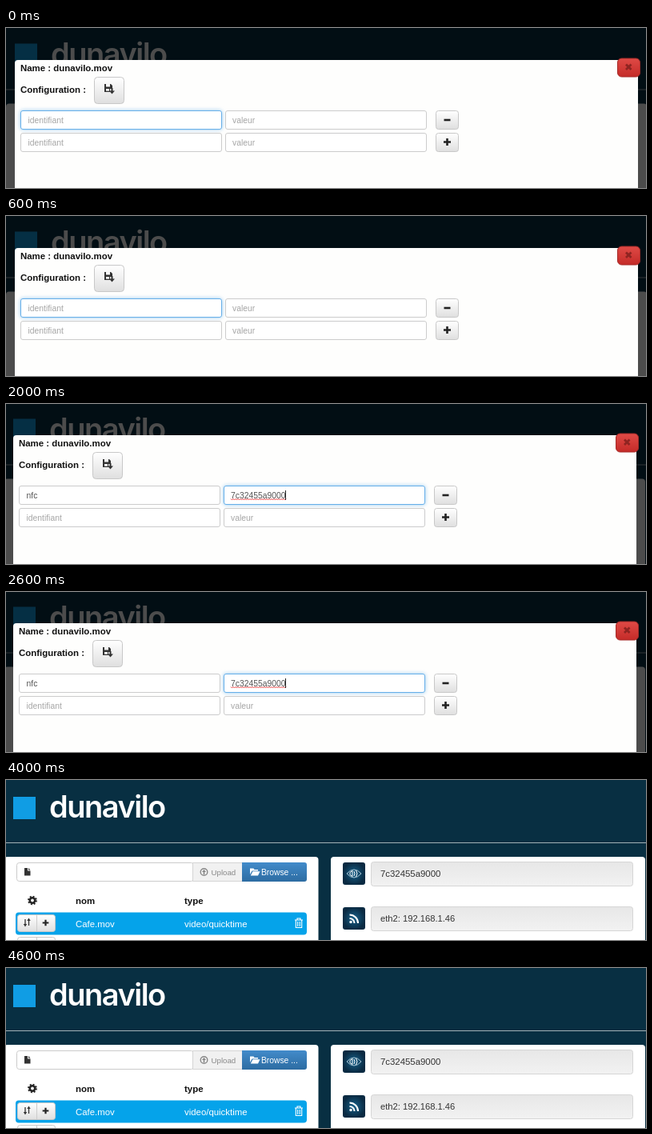
An HTML page that plays this animation: 800x200 px, repeating every 5000 ms.

```html
<!DOCTYPE html>
<html lang="fr">
<head>
<meta charset="utf-8">
<title>Configuration</title>
<style>
  html, body { margin: 0; width: 100%; height: 100%; overflow: hidden; background: #082f42; }
  svg { display: block; font: 11.4px "Liberation Sans", Arial, sans-serif; fill: #333; }
  .bold { font-weight: bold; font-size: 11.45px; fill: #111; }
  .brand { font: 600 38px Inter, sans-serif; letter-spacing: -1.5px; }
  .white { fill: #fff; }
  .field text { font-size: 10.35px; fill: #555; }
  .field.empty text { fill: #a5a5a5; }
  .field rect { fill: #fff; stroke: #ccc; }
  .field.focus rect { stroke: #66afe9; filter: drop-shadow(0 0 2.5px #66afe9b0); }
  .button { fill: url(#grey); stroke: #c8c8c8; }
  .line { fill: none; stroke: #222; stroke-width: 2.6; }
</style>
</head>
<body>
<svg width="800" height="200" viewBox="0 0 800 200">
  <defs>
    <linearGradient id="grey" x2="0" y2="1"><stop stop-color="#fff"/><stop offset="1" stop-color="#dfdfdf"/></linearGradient>
    <linearGradient id="well" x2="0" y2="1"><stop stop-color="#e7e7e7"/><stop offset="1" stop-color="#f2f2f2"/></linearGradient>
    <linearGradient id="blue" x2="0" y2="1"><stop stop-color="#428bca"/><stop offset="1" stop-color="#2d6ca2"/></linearGradient>
    <linearGradient id="red" x2="0" y2="1"><stop stop-color="#df4a46"/><stop offset="1" stop-color="#c42b28"/></linearGradient>
    <linearGradient id="green" x2="0" y2="1"><stop stop-color="#53ad53"/><stop offset="1" stop-color="#3d923d"/></linearGradient>
    <radialGradient id="glow"><stop stop-color="#17618a"/><stop offset="1" stop-color="#0a2a42"/></radialGradient>
    <path id="minus" class="line" d="M-4 0H4"/>
    <path id="plus" class="line" d="M-4.5 0H4.5M0-4.5V4.5"/>
    <path id="floppy" fill-rule="evenodd" d="M0 0H8L10 2V6H7V10H0ZM2 0V3.5H7V0ZM2 6V8.8H6V6Z"/>
    <g id="tools">
      <rect class="button" x="14.5" y="168.500" width="47" height="21" rx="3"/>
      <path d="M38.500 169V189" stroke="#ccc"/>
      <path d="M24 174V181M28.500 175V182" stroke="#333" stroke-width="1.3"/>
      <path d="M21.800 180H26.200L24 183.500ZM26.300 176H30.700L28.500 172.500Z"/>
      <use href="#plus" transform="translate(49.500 178.500) scale(.85)"/>
    </g>
  </defs>

  <g id="page">
    <rect x="-10" y="-10" width="820" height="230" fill="#082f42"/>
    <rect x="9" y="21" width="28" height="28" fill="#109de4"/>
    <text class="brand white" x="54" y="47">dunavilo</text>
    <path d="M-5 78.500H810" stroke="#a4b1b7"/>
    <rect class="white" x="-2" y="96" width="392.500" height="130" rx="4"/>
    <rect class="white" x="406" y="96" width="393" height="130" rx="4"/>

    <rect x="13.500" y="103.500" width="221" height="23" rx="3" fill="#fff" stroke="#ccc"/>
    <path d="M23 110H27V113.500H30.500V119.500H23ZM28 110L30.500 112.500H28Z"/>
    <path d="M233.500 103.500H296V126.500H233.500Z" fill="#f1f1f1" stroke="#d4d4d4"/>
    <circle cx="247.500" cy="115" r="4.300" fill="none" stroke="#888" stroke-width="1.4"/>
    <path d="M247.500 112L250 115H248.300V118H246.700V115H245Z" fill="#888"/>
    <text x="256.500" y="119" font-size="9.700" fill="#888">Upload</text>
    <path d="M295 103H373a3 3 0 0 1 3 3V124a3 3 0 0 1-3 3H295Z" fill="url(#blue)"/>
    <path class="white" d="M305 118V110.500H309.500L310.500 112H315V113.500H307.500ZM308.500 114.300H317.500L315 119.500H305.800Z"/>
    <text class="white" x="319" y="119" font-size="10.300">Browse ...</text>

    <circle cx="33" cy="150.500" r="3.200" class="line" stroke-width="2.4"/>
    <circle cx="33" cy="150.500" r="5" class="line" style="stroke-width:1.8" stroke-dasharray="1.96 1.96"/>
    <text class="bold" x="87" y="155">nom</text>
    <text class="bold" x="223" y="155">type</text>
    <rect x="12" y="165.500" width="364" height="28" rx="4" fill="#05a3ea"/>
    <use href="#tools"/>
    <use href="#tools" y="28"/>
    <text class="white" x="87" y="184">Cafe.mov</text>
    <text class="white" x="223" y="184">video/quicktime</text>
    <path d="M361 175H371M364 175V173H368V175M362.300 175V184.500H369.700V175M364.700 177V183M367.300 177V183" fill="none" stroke="#fff" stroke-width="1.1"/>

    <g stroke="#d6d6d6" fill="url(#well)">
      <rect x="456.500" y="102.500" width="327" height="30" rx="3"/>
      <rect x="456.500" y="158.500" width="327" height="30" rx="3"/>
    </g>
    <rect x="421" y="103" width="28" height="28" rx="3" fill="url(#glow)"/>
    <rect x="421" y="159" width="28" height="28" rx="3" fill="url(#glow)"/>
    <g fill="none" stroke="#a9c8d8">
      <path d="M426 117Q435 107 444 117Q435 127 426 117"/>
      <path d="M430 115.500V118.500L433 120.500V113.500ZM435 114q2 3 0 6M437.500 113q3 4 0 8" stroke="#fff"/>
    </g>
    <path d="M429.500 173a6 6 0 0 1 6 6M429.500 168.500a10.500 10.500 0 0 1 10.500 10.500" fill="none" stroke="#fff" stroke-width="2"/>
    <circle class="white" cx="431" cy="177.500" r="1.700"/>
    <text x="468" y="121">7c32455a9000</text>
    <text x="468" y="177" font-size="11.200">eth2: 192.168.1.46</text>
  </g>

  <g id="overlay">
    <rect width="800" height="200" opacity=".7" fill="#000"/>
    <g id="modal">
      <rect x="11" y="40" width="779" height="180" rx="4" fill="#fefefd"/>
      <text class="bold" x="18" y="54">Name : dunavilo.mov</text>
      <text class="bold" x="18" y="81">Configuration :</text>
      <g id="save">
        <rect class="button" x="110.500" y="61.500" width="37" height="33" rx="4"/>
        <use href="#floppy" x="123" y="70"/>
        <path d="M131.500 75H133.500V78.500H136L132.500 82.500L129 78.500H131.500Z"/>
      </g>
      <g id="saved">
        <rect x="110.500" y="61.500" width="37" height="33" rx="3" fill="url(#green)" stroke="#6f9fd0" stroke-width="1.500"/>
        <use class="white" href="#floppy" x="123" y="70"/>
        <path d="M129.500 78.500L132 81L136.500 76" fill="none" stroke="#fff" stroke-width="2"/>
      </g>
      <g id="key" class="field"><rect x="18.500" y="103.500" width="251" height="23" rx="2.500"/><text x="27.500" y="119"></text></g>
      <g id="value" class="field"><rect x="274.500" y="103.500" width="251" height="23" rx="2.500"/><text x="283" y="119"></text></g>
      <g class="field empty"><rect x="18.500" y="131.500" width="251" height="23" rx="2.500"/><text x="27.500" y="147">identifiant</text></g>
      <g class="field empty"><rect x="274.500" y="131.500" width="251" height="23" rx="2.500"/><text x="283" y="147">valeur</text></g>
      <path id="squiggle" fill="none" stroke="#e33" stroke-width=".9"/>
      <path id="caret" stroke="#222"/>
      <rect class="button" x="537.500" y="103.500" width="28" height="23" rx="3"/>
      <rect class="button" x="537.500" y="131.500" width="28" height="23" rx="3"/>
      <use href="#minus" x="551.500" y="115"/>
      <use href="#plus" x="551.500" y="142.500"/>
      <rect x="764.500" y="38" width="28" height="23" rx="5" fill="url(#red)" stroke="#a52b28"/>
      <path d="M775 45.500L781.500 52M781.500 45.500L775 52" stroke="#8f2421" stroke-width="2.800"/>
    </g>
  </g>
</svg>
<script>
  const $ = id => document.getElementById(id);
  const steps = [
    { x: 0, y: 0, focus: "key" },
    { x: 0, y: 0, key: "nfc", focus: "key", caret: 41.5 },
    { x: -2, y: -1, key: "nfc", value: "7c32455a9000", focus: "value", caret: 351.5 },
    { x: -1.5, y: -.5, key: "nfc", value: "7c32455a9000", saved: true },
    { closed: true }
  ];

  const show = (id, on) => $(id).setAttribute("display", on ? "inline" : "none");
  const move = (id, x, y) => $(id).setAttribute("transform", `translate(${x} ${y})`);

  function setField(id, text, hint, focus) {
    const field = $(id);
    field.setAttribute("class", `field${text ? "" : " empty"}${focus === id ? " focus" : ""}`);
    field.querySelector("text").textContent = text || hint;
  }

  function render(s) {
    show("overlay", !s.closed);
    if (s.closed) return move("page", 0, 0);
    move("page", s.x + 2, s.y - 1.5);
    move("modal", s.x, s.y);
    setField("key", s.key, "identifiant", s.focus);
    setField("value", s.value, "valeur", s.focus);
    show("save", !s.saved);
    show("saved", s.saved);
    show("squiggle", s.focus === "value");
    show("caret", s.caret);
    if (s.caret) $("caret").setAttribute("d", `M${s.caret} 109V121`);
  }

  $("squiggle").setAttribute("d", "M283 119.5" + "l1.5 1.5l1.5 -1.5".repeat(23));

  const start = performance.now();
  let current = -1;
  function tick() {
    const i = Math.floor((performance.now() - start) / 1000) % steps.length;
    if (i !== current) render(steps[current = i]);
    requestAnimationFrame(tick);
  }
  tick();
</script>
</body>
</html>
```
